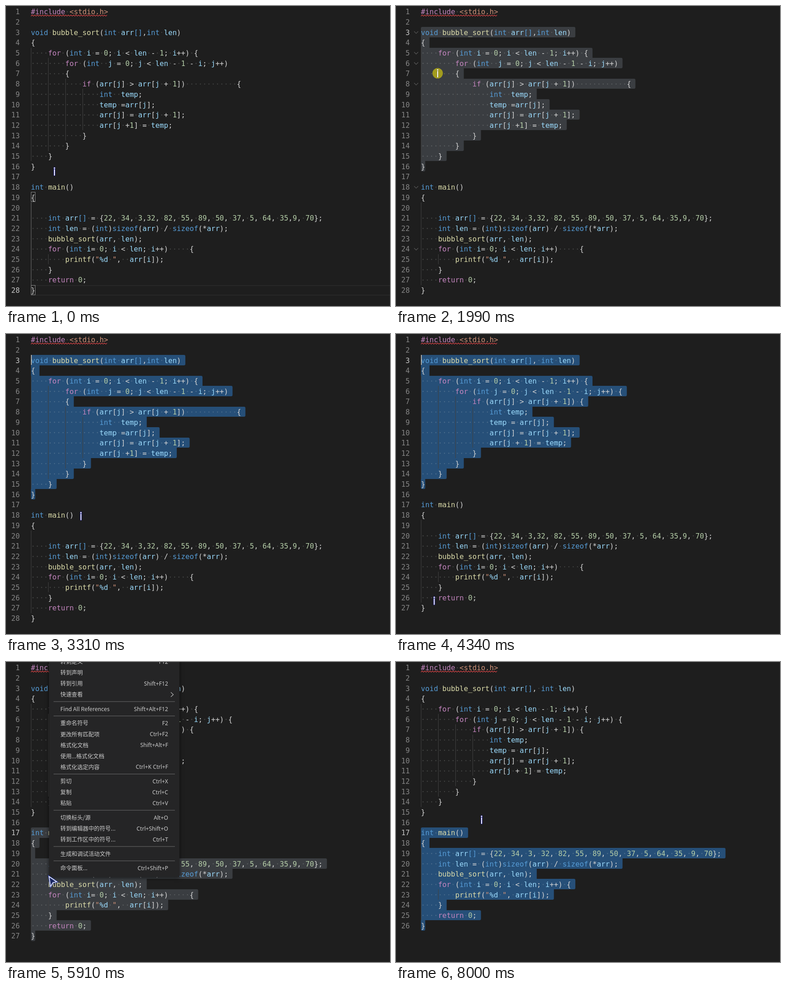
An HTML page with a canvas that plays this animation: 848x660 px, repeating every 8.17 s.

```html
<!DOCTYPE html>
<html lang="zh">
<head>
<meta charset="utf-8">
<title>Format selection</title>
<style>
  html, body { margin: 0; width: 100%; height: 100%; overflow: hidden; background: #1e1e1e; }
  canvas { display: block; width: 848px; height: 660px; }
</style>
</head>
<body>
<canvas id="stage" width="848" height="660"></canvas>
<script>
const ctx = document.getElementById('stage').getContext('2d', { alpha: false });
const LOOP = 8170, LEFT = 55, CHAR = 9.474, ROW = 22.7, TOP = 1.2;
const CODE_FONT = '15.74px "DejaVu Sans Mono", "Noto Sans Mono", monospace';
const LABEL_FONT = '12.4px "Noto Sans CJK SC", "Noto Sans", sans-serif';
const KEY_FONT = '12.2px "Noto Sans", "Open Sans", sans-serif';

const rawHead = `#include <stdio.h>

void bubble_sort(int arr[],int len)
{
    for (int i = 0; i < len - 1; i++) {
        for (int  j = 0; j < len - 1 - i; j++)
        {
            if (arr[j] > arr[j + 1])            {
                int  temp;
                temp =arr[j];
                arr[j] = arr[j + 1];
                arr[j +1] = temp;
            }
        }
    }
}
`;
const cleanHead = `#include <stdio.h>

void bubble_sort(int arr[], int len)
{
    for (int i = 0; i < len - 1; i++) {
        for (int j = 0; j < len - 1 - i; j++) {
            if (arr[j] > arr[j + 1]) {
                int temp;
                temp = arr[j];
                arr[j] = arr[j + 1];
                arr[j + 1] = temp;
            }
        }
    }
}
`;
const rawMain = `
int main()
{

    int arr[] = {22, 34, 3,32, 82, 55, 89, 50, 37, 5, 64, 35,9, 70};
    int len = (int)sizeof(arr) / sizeof(*arr);
    bubble_sort(arr, len);
    for (int i= 0; i < len; i++)     {
        printf("%d ",  arr[i]);
    }
    return 0;
}`;
const cleanMain = `
int main()
{
    int arr[] = {22, 34, 3, 32, 82, 55, 89, 50, 37, 5, 64, 35, 9, 70};
    int len = (int)sizeof(arr) / sizeof(*arr);
    bubble_sort(arr, len);
    for (int i = 0; i < len; i++) {
        printf("%d ", arr[i]);
    }
    return 0;
}`;

const TOKEN = /(#include|\b(?:for|if|return)\b)|(\b(?:void|int|sizeof)\b|\[\])|(\b(?:bubble_sort|main|printf)\b)|(<stdio\.h>|")|(%d|[a-z]\w*)|(\d+)|([^\s\w"%]+?)/g;
const COLORS = ['#c586c0', '#569cd6', '#dcdcaa', '#ce9178', '#9cdcfe', '#b5cea8', '#d4d4d4'];

function parse(text) {
  const rows = text.split('\n').map(s => ({
    text: s,
    indent: s.search(/\S/),
    folds: /\)\s*\{?$/.test(s),
    tokens: [...s.matchAll(TOKEN)].map(m => ({
      col: m.index, text: m[0], color: COLORS[m.slice(1).findIndex(g => g !== undefined)]
    }))
  }));
  rows.forEach((r, i) => {
    const next = rows[i + 1];
    r.guides = r.indent >= 0 ? r.indent / 4 : next && next.indent > 0 ? 1 : 0;
  });
  return rows;
}
const docs = [rawHead + rawMain, cleanHead + rawMain, cleanHead + cleanMain].map(parse);

// [time, x, y] of the mouse
const path = [
  [50, 107, 364], [200, 73, 351], [460, 73, 351], [860, 37, 181], [890, 37, 180],
  [1270, 32, 72], [1360, 35, 60], [1690, 35, 60], [1960, 92, 148], [2320, 92, 148],
  [2990, 148, 397], [3130, 148, 397], [3310, 165.5, 400.5], [3580, 165.5, 400.5],
  [4420, 76, 606], [4760, 76, 606], [4970, 25, 442], [5200, 25, 376], [5400, 25, 376],
  [5740, 95, 472], [6010, 95, 472], [6590, 145, 249], [6740, 147, 234],
  [7570, 147, 234], [8000, 189, 347]
];
const presses = [[500, 1360], [1980, 2130], [2990, 3160], [4490, 5440], [5770, 5910], [6970, 7140]];
const menus = [{ from: 2130, to: 3160, x: 92, y: 147.5 }, { from: 5910, to: 7140, x: 95, y: -19.5 }];
const items = [
  ['转到定义', 'F12'], ['转到声明', ''], ['转到引用', 'Shift+F12'], ['快速查看', '>'], null,
  ['Find All References', 'Shift+Alt+F12'], null,
  ['重命名符号', 'F2'], ['更改所有匹配项', 'Ctrl+F2'], ['格式化文档', 'Shift+Alt+F'],
  ['使用...格式化文档', ''], ['格式化选定内容', 'Ctrl+K Ctrl+F'], null,
  ['剪切', 'Ctrl+X'], ['复制', 'Ctrl+C'], ['粘贴', 'Ctrl+V'], null,
  ['切换标头/源', 'Alt+O'], ['转到编辑器中的符号...', 'Ctrl+Shift+O'], ['转到工作区中的符号...', 'Ctrl+T'], null,
  ['生成和调试活动文件', ''], null, ['命令面板...', 'Ctrl+Shift+P']
];

const within = (t, a, b) => t >= a && t < b;
const clamp = (v, a, b) => Math.max(a, Math.min(b, v));
const rowY = n => TOP + (n - 1) * ROW;
const rowPx = n => Math.floor(rowY(n));
const colX = c => LEFT + c * CHAR;

function mouseAt(t) {
  const i = path.findIndex(k => k[0] > t);
  if (i === 0) return { x: path[0][1], y: path[0][2] };
  if (i < 0) return { x: path.at(-1)[1], y: path.at(-1)[2] };
  const [t0, x0, y0] = path[i - 1], [t1, x1, y1] = path[i];
  const k = (t - t0) / (t1 - t0);
  return { x: x0 + (x1 - x0) * k, y: y0 + (y1 - y0) * k };
}

function dragCaret(rows, t, end) {
  const m = mouseAt(t < end ? t - 25 : end);
  const line = clamp(Math.floor((m.y - TOP) / ROW) + 1, 1, rows.length);
  return { line, col: clamp(Math.round((m.x - LEFT) / CHAR), 0, rows[line - 1].text.length) };
}

function stateAt(t) {
  const rows = docs[t < 3390 ? 0 : t < 7140 ? 1 : 2];
  let caret, anchor;
  if (t < 500) caret = anchor = { line: 28, col: 1 };
  else if (t < 3390) { caret = dragCaret(rows, t, 1360); anchor = { line: 16, col: 1 }; }
  else if (t < 4420) { caret = { line: 3, col: 0 }; anchor = { line: 15, col: 1 }; }
  else if (t < 7140) { caret = dragCaret(rows, t, 5200); anchor = { line: 27, col: 1 }; }
  else { caret = { line: 17, col: 0 }; anchor = { line: 26, col: 1 }; }
  return {
    rows, caret, anchor,
    focused: !within(t, 1980, 3160) && !within(t, 5770, 7140),
    block: t < 500 ? [19, 28] : within(t, 4490, 5200) ? [18, 27] : null,
    blank: t < 500 || t >= 7680
  };
}

function foldAlpha(t) {
  const ramp = (on, off) => clamp((t - on) / 300, 0, 1) * (1 - clamp((t - off) / 380, 0, 1));
  return Math.max(ramp(680, 1790), ramp(4850, 5490));
}

function drawSelection({ rows, caret, anchor, focused }) {
  const right = n => n < caret.line || n > anchor.line ? 0
    : n === anchor.line ? anchor.col : rows[n - 1].text.length + 1;
  ctx.fillStyle = focused ? '#264f78' : '#3a3d41';
  for (let n = caret.line; n <= anchor.line; n++) {
    const x = colX(n === caret.line ? caret.col : 0);
    const y = rowPx(n), w = colX(right(n)) - x;
    if (w <= 0) continue;
    const round = other => other < right(n) ? 3 : 0;
    ctx.beginPath();
    ctx.roundRect(x, y, w, rowPx(n + 1) - y, [
      n === caret.line ? 3 : 0, round(right(n - 1)), round(right(n + 1)), n === anchor.line ? 3 : 0
    ]);
    ctx.fill();
  }
}

function drawRow(row, n, s) {
  const y = rowPx(n), base = rowY(n) + 17;
  for (let g = 0; g < row.guides; g++) {
    const active = s.block && g === 0 && n > s.block[0] && n < s.block[1];
    ctx.fillStyle = active ? '#707070' : '#404040';
    ctx.fillRect(Math.round(colX(g * 4)), y, 1, rowPx(n + 1) - y);
  }
  ctx.fillStyle = 'rgba(227,228,226,.2)';
  [...row.text].forEach((ch, c) => {
    if (ch !== ' ') return;
    ctx.beginPath();
    ctx.arc(colX(c + .5), base - 5.5, 1.2, 0, 7);
    ctx.fill();
  });
  ctx.font = CODE_FONT;
  for (const k of row.tokens) {
    ctx.fillStyle = k.color;
    ctx.fillText(k.text, colX(k.col), base);
  }
  ctx.fillStyle = n === s.caret.line ? '#c6c6c6' : '#858585';
  ctx.textAlign = 'right';
  ctx.fillText(n, 30.4, base);
  ctx.textAlign = 'left';
}

function line(points, color, width) {
  ctx.beginPath();
  points.forEach(p => ctx.lineTo(...p));
  ctx.strokeStyle = color;
  ctx.lineWidth = width;
  ctx.stroke();
}

function drawEditor(s, t) {
  const { rows, caret, anchor } = s;
  ctx.fillStyle = '#1e1e1e';
  ctx.fillRect(0, 0, 848, 660);
  if (caret.line === anchor.line && caret.col === anchor.col) {
    ctx.strokeStyle = '#282828';
    ctx.lineWidth = 2;
    ctx.strokeRect(LEFT + 1, rowPx(caret.line) + 1, 848, 21);
  }
  drawSelection(s);
  rows.forEach((r, i) => drawRow(r, i + 1, s));

  const wave = [];
  for (let x = LEFT, i = 0; x <= 225; x += 2.85, i++) wave.push([x, i % 2 ? 19.8 : 22.3]);
  line(wave, '#e5484a', 1.1);

  if (s.block) for (const n of s.block) {
    ctx.strokeStyle = '#888';
    ctx.lineWidth = 1;
    ctx.strokeRect(LEFT + .5, rowPx(n) + .5, 9, 21);
  }
  if (s.focused && !s.blank) {
    ctx.fillStyle = '#aeafad';
    ctx.fillRect(Math.round(colX(caret.col)), rowPx(caret.line), 2, 22);
  }
  ctx.globalAlpha = foldAlpha(t);
  rows.forEach((r, i) => {
    const y = rowY(i + 1) + 9.3;
    if (r.folds) line([[40, y], [44.5, y + 4.4], [49, y]], '#a5a5a5', 1.1);
  });
  ctx.globalAlpha = 1;
}

function drawMenu(menu, mouse) {
  const { x, y } = menu, width = 288;
  ctx.save();
  ctx.shadowColor = 'rgba(0,0,0,.6)';
  ctx.shadowBlur = 8;
  ctx.shadowOffsetY = 2;
  ctx.fillStyle = '#252526';
  ctx.fillRect(x, y, width, 492.5);
  ctx.restore();

  let top = y + 7;
  const placed = items.map(item => {
    const h = item ? 24.05 : 7.55;
    top += h;
    return { item, y: top - h / 2 };
  });
  const gap = p => p.item ? Math.abs(p.y - mouse.y) : Infinity;
  const nearest = placed.reduce((a, b) => gap(b) < gap(a) ? b : a);
  const hover = gap(nearest) < 16 ? nearest : null;

  for (const p of placed) {
    if (!p.item) {
      ctx.fillStyle = '#606061';
      ctx.fillRect(x + 10, p.y - 1, 268, 1.2);
      continue;
    }
    if (p === hover) {
      ctx.fillStyle = '#094771';
      ctx.fillRect(x + .5, p.y - 11.7, width - 1, 22.6);
    }
    const color = p === hover ? '#fff' : '#ccc';
    const [label, key] = p.item;
    ctx.fillStyle = color;
    ctx.font = LABEL_FONT;
    ctx.fillText(label, x + 25, p.y + 4.6);
    if (key === '>') {
      line([[x + 269, p.y - 5], [x + 274.5, p.y], [x + 269, p.y + 5]], color, 1.1);
    } else {
      ctx.font = KEY_FONT;
      ctx.textAlign = 'right';
      ctx.fillText(key, x + 263, p.y + 4.4);
      ctx.textAlign = 'left';
    }
  }
}

function drawPointer({ x, y }, arrow, pressed) {
  if (pressed) {
    ctx.fillStyle = 'rgba(180,172,24,.85)';
    ctx.beginPath();
    ctx.arc(x, y, 11.5, 0, 7);
    ctx.fill();
  }
  if (arrow) {
    ctx.beginPath();
    [[0, 0], [17, 11.5], [8.5, 13.5], [3.5, 22]].forEach(([dx, dy]) => ctx.lineTo(x + dx, y + dy));
    ctx.closePath();
    ctx.strokeStyle = '#2438a0';
    ctx.lineWidth = 3.5;
    ctx.stroke();
    ctx.fillStyle = '#1c2a66';
    ctx.fill();
    ctx.strokeStyle = '#eef0ff';
    ctx.lineWidth = 1.6;
    ctx.stroke();
    return;
  }
  ctx.fillStyle = pressed ? '#8a8430' : '#1c1c8c';
  ctx.beginPath();
  ctx.roundRect(x - 2, y - 10, 4, 20, 2);
  ctx.fill();
  ctx.fillStyle = '#fff';
  ctx.fillRect(x - 1, y - 5, 2, 14);
  ctx.beginPath();
  ctx.arc(x, y - 7.5, 1.5, 0, 7);
  ctx.fill();
}

function render(t) {
  const mouse = mouseAt(t);
  const menu = menus.find(m => within(t, m.from, m.to));
  drawEditor(stateAt(t), t);
  if (menu) drawMenu(menu, mouse);
  drawPointer(mouse, menu || mouse.x < 53, presses.some(p => within(t, ...p)));
}

const start = performance.now();
function tick() {
  render((performance.now() - start) % LOOP);
  requestAnimationFrame(tick);
}
tick();
</script>
</body>
</html>
```
